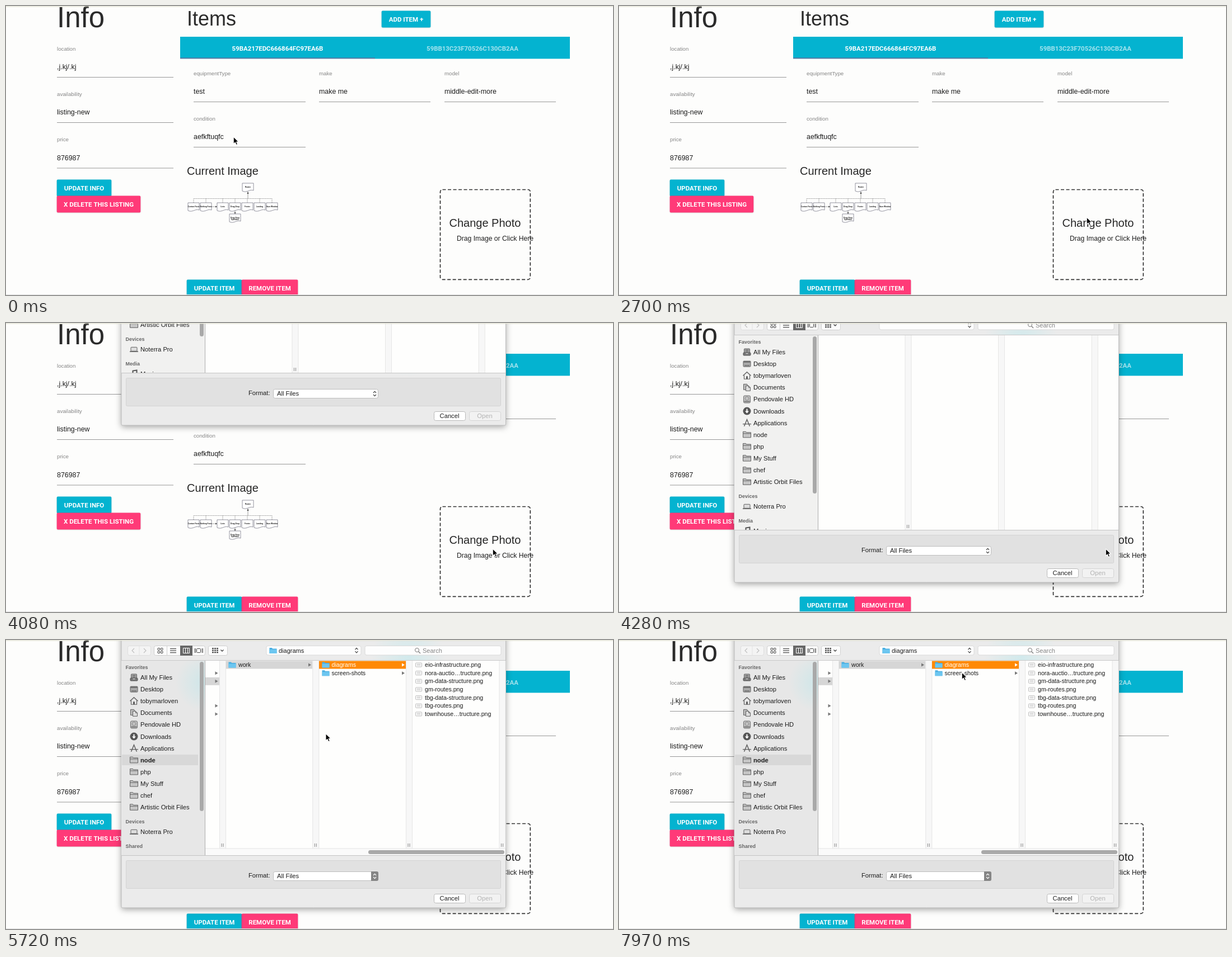
An HTML page with a canvas for the animation above (7990 ms loop, 1084 px wide and 517 px high).

```html
<!DOCTYPE html>
<html lang="en">
<head>
<meta charset="utf-8">
<title>Listing editor</title>
<style>
html, body { margin: 0; width: 100%; height: 100%; overflow: hidden; background: #fdfdfc; }
canvas { display: block; width: 1084px; height: 517px; }
</style>
</head>
<body>
<canvas id="stage"></canvas>
<script>
const W = 1084, H = 517, LOOP = 7990;
const canvas = document.getElementById('stage');
const dpr = window.devicePixelRatio || 1;
canvas.width = W * dpr;
canvas.height = H * dpr;
const c = canvas.getContext('2d');

const SANS = '"Liberation Sans", Arial, sans-serif';
const ROBOTO = 'Roboto, sans-serif';
const CYAN = '#04b3d0', PINK = '#ff3a78', INK = '#1c1c1c';

// ---------- drawing helpers ----------
function text(s, x, y, size, color = INK, { align = 'left', weight = 400, font = SANS } = {}) {
  c.font = `${weight} ${size}px ${font}`;
  c.textAlign = align;
  c.fillStyle = color;
  c.fillText(s, x, y);
}
function rect(x, y, w, h, color) {
  c.fillStyle = color;
  c.fillRect(x, y, w, h);
}
function box(x, y, w, h, r, fill, stroke) {
  c.beginPath();
  c.roundRect(x, y, w, h, r);
  if (fill) { c.fillStyle = fill; c.fill(); }
  if (stroke) { c.strokeStyle = stroke; c.stroke(); }
}
function path(pts, { fill, stroke, close = false, width = 1 } = {}) {
  c.beginPath();
  for (let i = 0; i < pts.length; i += 2) c.lineTo(pts[i], pts[i + 1]);
  if (close) c.closePath();
  if (fill) { c.fillStyle = fill; c.fill(); }
  if (stroke) { c.lineWidth = width; c.strokeStyle = stroke; c.stroke(); c.lineWidth = 1; }
}
function withShadow(blur, dy, alpha, draw) {
  c.save();
  c.shadowColor = `rgba(0,0,0,${alpha})`;
  c.shadowBlur = blur * dpr;
  c.shadowOffsetY = dy * dpr;
  draw();
  c.restore();
}
function at(x, y, draw) {
  c.save();
  c.translate(x, y);
  draw();
  c.restore();
}

// ---------- page ----------
function button(label, x, y, w, color) {
  withShadow(2, .5, .2, () => box(x - .3, y - .5, w + .6, 30, 2, color));
  text(label, x + w / 2, y + 19, 11.5, '#fff', { align: 'center', weight: 700, font: ROBOTO });
}
function field(label, value, x, y, w) {
  text(label, x, y + 3.5, 9.7, '#868686');
  text(value, x, y + 37, 12.4);
  rect(x, y + 51, w, 1, '#979797');
}
function note(label, x, y) {
  c.beginPath();
  c.moveTo(x - 10, y + 14);
  c.lineTo(x - 10, y);
  c.lineTo(x + 10, y);
  c.lineTo(x + 10, y + 13);
  c.bezierCurveTo(x + 3, y + 10, x - 2, y + 18, x - 10, y + 14);
  c.fillStyle = '#fff';
  c.fill();
  c.lineWidth = .7;
  c.strokeStyle = '#667';
  c.stroke();
  c.lineWidth = 1;
  label.split('|').forEach((s, i) =>
    text(s, x, y + 7.5 + i * 3.4, 3.2, '#111', { align: 'center', weight: 700 }));
}
function diagram() {
  c.setLineDash([2, 1]);
  path([335, 352, 335, 344.5, 475, 344.5, 475, 352], { stroke: '#888', width: .8 });
  for (const x of [357, 387, 409, 431, 453]) path([x, 344.5, x, 352], { stroke: '#888', width: .8 });
  c.setLineDash([]);
  path([432, 344, 432, 332], { stroke: '#888', width: .8 });
  path([430.5, 336, 432, 332, 433.5, 336], { fill: '#444' });
  path([367, 359, 377, 359], { stroke: '#999', width: .8 });
  path([374, 357.5, 377, 359, 374, 360.5], { fill: '#444' });
  path([409, 366, 409, 372], { stroke: '#777', width: .8 });
  path([407.5, 369, 409, 372, 410.5, 369], { fill: '#444' });
  note('Router', 432, 317);
  ['Contact Form', 'Nothing Form', 'Lists', 'Drag-Drop', 'Footer', 'Landing', 'Save Window']
    .forEach((s, i) => note(s, [335, 357, 387, 409, 431, 453, 475][i], 352));
  note('Drag-Drop|Uploader', 409, 372);
}
function page() {
  rect(0, 0, W, H, '#fdfdfc');
  text('Info', 91, 38, 51, '#2b2b2b');
  field('location', ',j.kj/.kj', 91, 76, 208);
  field('availability', 'listing-new', 91, 157, 208);
  field('price', '876987', 91, 238.5, 208);
  button('UPDATE INFO', 91, 311, 97, CYAN);
  button('X DELETE THIS LISTING', 91, 340, 149, PINK);

  text('Items', 323, 35, 36, '#2b2b2b');
  button('ADD ITEM +', 671, 9, 87, CYAN);
  rect(311, 55, 696, 39.4, CYAN);
  rect(311, 92.7, 348, 1.3, '#76618f');
  const tab = { align: 'center', weight: 700, font: ROBOTO };
  text('59BA217EDC666864FC97EA6B', 485, 79.5, 11.4, '#fff', tab);
  text('59BB13C23F70526C130CB2AA', 833, 79.5, 11.4, 'rgba(255,255,255,.64)', tab);
  field('equipmentType', 'test', 335, 120, 200);
  field('make', 'make me', 559, 120, 199);
  field('model', 'middle-edit-more', 783, 120, 199);
  field('condition', 'aefkftuqfc', 335, 201, 200);

  text('Current Image', 323, 301.5, 20, '#262626');
  diagram();
  button('UPDATE ITEM', 323, 490, 98, CYAN);
  button('REMOVE ITEM', 421, 490, 100, PINK);

  c.setLineDash([6, 3.5]);
  c.lineWidth = 1.7;
  box(775.5, 328.5, 160.8, 160.8, 4, null, '#333');
  c.lineWidth = 1;
  c.setLineDash([]);
  text('Change Photo', 791.5, 395, 20, '#262626');
  text('Drag Image or Click Here', 805, 420, 12.15);
}

// ---------- icons, drawn around 0,0 ----------
const GREY = '#606060';
const icons = {
  folder() {
    path([-7, 5, -7, -5.5, -2, -5.5, -1, -4, 7, -4, 7, 5], { close: true, fill: '#c6c6c6', stroke: GREY });
    path([-7, -2, 7, -2], { stroke: GREY });
  },
  tray() {
    box(-5, -6, 10, 8, 1, '#aaa', GREY);
    path([-3, -3.5, 3, -3.5], { stroke: '#555' });
    path([-3, -1, 3, -1], { stroke: '#555' });
    box(-6.5, 1, 13, 5, 1, '#777', '#555');
    rect(-2, 2, 4, 1.2, '#ddd');
  },
  desktop() {
    box(-6.5, -5, 13, 10, 1, '#aaa', GREY);
    rect(-6, -4.5, 12, 2, '#666');
    for (let i = -4; i < 5; i += 3) rect(i, 2, 2, 2, '#666');
  },
  house() {
    path([-7, 0, 0, -6.5, 7, 0], { stroke: GREY, width: 1.4 });
    path([-5, -1, -5, 6, 5, 6, 5, -1], { stroke: GREY, width: 1.2 });
    rect(-1.5, 1, 3, 5, GREY);
  },
  docs() {
    path([-6, -6, 0, -6, 2, -3, 2, 4, -6, 4], { close: true, fill: '#bbb', stroke: GREY });
    path([-2, -3, 3, -3, 6, 0, 6, 6, -2, 6], { close: true, fill: '#ddd', stroke: GREY });
    path([3, -3, 3, 0, 6, 0], { stroke: GREY });
  },
  disk() {
    box(-6, -6.5, 12, 13, 2, '#c2c2c2', '#707070');
    c.beginPath();
    c.arc(0, -1.5, 3.3, 0, 7);
    c.strokeStyle = '#888';
    c.stroke();
    rect(-5, 3, 10, 2, '#777');
  },
  down() {
    c.beginPath();
    c.arc(0, 0, 7, 0, 7);
    c.fillStyle = '#555';
    c.fill();
    path([0, -4, 0, 3], { stroke: '#fff', width: 2 });
    path([-3.5, 0, 0, 4, 3.5, 0], { fill: '#fff' });
  },
  apps() {
    path([-5, 6, 0, -6, 5, 6], { stroke: GREY, width: 1.5 });
    path([-7.5, 2, 7.5, 2], { stroke: GREY, width: 1.3 });
  },
  laptop() {
    box(-5.5, -4, 11, 7, 1, '#ddd', GREY);
    rect(-7.5, 3, 15, 1.6, GREY);
  },
  music() {
    path([-2, 5, -2, -5, 5, -6, 5, 3], { stroke: '#555', width: 2 });
  },
  blue() {
    path([-6.5, 5, -6.5, -5, -2, -5, -1, -3.5, 6.5, -3.5, 6.5, 5], { close: true, fill: '#4aafe2' });
    rect(-6.5, -2, 13, 7, '#6cc6f0');
  },
  image() {
    box(-5.5, -3.5, 11, 7, 1, '#fff', '#bbb');
    path([-3.5, -1, 3.5, -1], { stroke: '#bbb' });
    path([-3.5, 1, 3.5, 1], { stroke: '#ccc' });
  }
};
const icon = (name, x, y) => at(x, y, icons[name]);
function updown(x, y, color) {
  path([x - 2.5, y - 1.5, x, y - 4.2, x + 2.5, y - 1.5], { stroke: color, width: 1.2 });
  path([x - 2.5, y + 1.5, x, y + 4.2, x + 2.5, y + 1.5], { stroke: color, width: 1.2 });
}
const arrow = (x, y, color) => path([x - 2.5, y - 3, x + 2.5, y, x - 2.5, y + 3], { fill: color });

// ---------- file dialog ----------
const places = [
  ['tray', 'All My Files'], ['desktop', 'Desktop'], ['house', 'tobymarloven'],
  ['docs', 'Documents'], ['disk', 'Pendovale HD'], ['down', 'Downloads'],
  ['apps', 'Applications'], ['folder', 'node'], ['folder', 'php'],
  ['folder', 'My Stuff'], ['folder', 'chef'], ['folder', 'Artistic Orbit Files']
];
const files = ['eio-infrastructure.png', 'nora-auctio…tructure.png', 'gm-data-structure.png',
  'gm-routes.png', 'tbg-data-structure.png', 'tbg-routes.png', 'townhouse…tructure.png'];

function glow(x, y, r, alpha) {
  const g = c.createRadialGradient(x, y, 0, x, y, r);
  g.addColorStop(0, `rgba(150,230,238,${alpha})`);
  g.addColorStop(1, 'rgba(150,230,238,0)');
  c.fillStyle = g;
  c.fillRect(x - r, y - r, 2 * r, 2 * r);
}
function place(name, label, y, weight = 400) {
  icon(name, 228.5, y);
  text(label, 240, y + 4, 11.2, INK, { weight });
}
function toolbar(filled) {
  const edge = '#cfcfcf';
  box(217.5, 10.5, 41, 17, 3, '#f4f4f4', '#dedede');
  path([229, 15, 225, 19, 229, 23], { stroke: '#c0c0c0', width: 1.2 });
  path([246, 15, 250, 19, 246, 23], { stroke: '#c0c0c0', width: 1.2 });
  path([238, 11, 238, 27], { stroke: '#e2e2e2' });

  box(264.5, 10.5, 91, 17, 3, '#fcfcfc', edge);
  rect(311, 10, 22, 18, '#676767');
  path([287.5, 11, 287.5, 27], { stroke: edge });
  for (const x of [271, 276.5]) for (const y of [14.5, 20]) box(x, y, 3.5, 3.5, .5, null, '#444');
  for (const y of [15, 18.5, 22]) rect(293, y, 11, 1.2, '#444');
  box(316.5, 14.5, 11, 9, 0, null, '#fff');
  for (const x of [320, 324]) rect(x, 14.5, 1, 9, '#fff');
  box(340.5, 15.5, 7, 7, 1, null, '#444');
  for (const x of [336.5, 338, 349.5, 351]) rect(x, 15, .9, 8, '#555');

  box(361.5, 10.5, 34, 17, 3, '#fcfcfc', edge);
  for (let i = 0; i < 3; i++) for (const y of [14, 17.5, 21]) rect(368 + i * 4, y, 3, 2.3, '#555');
  path([383.5, 17.5, 386, 20, 388.5, 17.5], { stroke: '#444', width: 1.3 });

  box(465, 10.5, 169, 16.5, 3, '#fdfdfd', '#dadada');
  updown(626, 18.7, '#444');
  if (filled) {
    icon('blue', 477, 19);
    text('diagrams', 487, 22.8, 11);
  }
  box(641, 10.5, 243, 16.5, 3, '#fdfdfd', '#dadada');
  c.beginPath();
  c.arc(734, 18, 3.5, 0, 7);
  c.strokeStyle = '#777';
  c.stroke();
  path([736.5, 20.5, 740, 24], { stroke: '#777', width: 1.3 });
  text('Search', 744, 22.8, 11, '#858585');
}
function sidebar(filled, ready) {
  c.save();
  c.beginPath();
  c.rect(206, 37, 149, 348);
  c.clip();
  rect(206, 37, 149, 348, ready ? '#e7e7e7' : '#f1f1f0');
  if (ready) glow(355, 76, 52, .3);
  if (filled) rect(207, 205, 136, 19, '#d8d8d8');
  const head = (s, y) => text(s, 213.5, y, 9, '#666', { weight: 700 });
  head('Favorites', 51.5);
  places.forEach(([name, label], i) =>
    place(name, label, 67 + i * 21.12, filled && label === 'node' ? 700 : 400));
  head('Devices', 327.8);
  place('laptop', 'Noterra Pro', 343.3);
  head(ready ? 'Shared' : 'Media', 371.8);
  if (!ready) place('music', 'Music', 386.5);
  box(346, 39, 7, ready ? 267 : 281, 3.5, '#a9a9a9');
  c.restore();
  rect(355, 37, 1, 348, '#adadad');
}
function strip(x, bottom, grip) {
  rect(x, 37, 11.5, bottom - 37, '#f7f7f7');
  rect(x, 37, 1, bottom - 37, '#e6e6e6');
  rect(x + 11, 37, 1, bottom - 37, '#e6e6e6');
  if (grip) for (const dx of [3.5, 6.5]) rect(x + dx, bottom - 9, 1, 6, '#888');
}
function columns(filled) {
  rect(356, 37, 536, 348, '#fefefd');
  if (!filled) {
    [510.5, 677, 843.7].forEach((x, i) => strip(x, 385, i === 0));
    return;
  }
  const row = i => 44.5 + i * 14.65;
  for (const x of [381, 547.3, 714, 880.5]) strip(x, 373, true);
  rect(356, row(2) - 7, 25, 14, '#d6d6d6');
  for (const i of [1, 2, 5, 6]) arrow(376, row(i), '#777');

  rect(393, 37.5, 154, 14, '#d6d6d6');
  icon('blue', 404, row(0));
  text('work', 415, row(0) + 3.6, 10.6);
  arrow(542.5, row(0), '#777');

  rect(559, 37.5, 155, 14, '#ff8905');
  icon('blue', 571, row(0));
  text('diagrams', 581.5, row(0) + 3.6, 10.6, '#fff');
  arrow(709.5, row(0), '#fff');
  icon('blue', 571, row(1));
  text('screen-shots', 581.5, row(1) + 3.6, 10.6);
  arrow(709.5, row(1), '#777');

  files.forEach((s, i) => {
    icon('image', 737, row(i));
    text(s, 748, row(i) + 3.6, 10.6);
  });
  rect(356, 373, 536, 12, '#fafafa');
  rect(356, 372.5, 536, 1, '#e6e6e6');
  box(647, 376, 243, 7, 3.5, '#a9a9a9');
}
function dialog(off, filled, ready) {
  c.save();
  c.beginPath();
  c.rect(0, 1, W, H);
  c.clip();
  c.translate(0, off);
  withShadow(12, 3, .36, () => box(206, -20, 686.5, 499, 2, '#ebebeb'));
  box(206, -20, 686.5, 499, 2, null, '#bcbcbc');
  box(214.5, 394.5, 669, 50, 2, '#e1e1e1', '#d3d3d3');

  c.save();
  c.beginPath();
  c.rect(207, 0, 685, 478);
  c.clip();
  glow(718, 30 - off, 66, .3);
  c.restore();

  toolbar(filled);
  rect(206, 36, 686, 1, '#c9c9c9');
  sidebar(filled, ready);
  columns(filled);
  rect(206, 385, 686, 1, '#c4c4c4');

  text('Format:', 471.5, 425.3, 11.2, INK, { align: 'right' });
  box(477.5, 414.5, 187, 16, 3, '#fff', '#bdbdbd');
  if (ready) box(652, 414, 13, 17, [0, 3, 3, 0], '#858585');
  updown(658.5, 422.5, ready ? '#fff' : '#444');
  text('All Files', 484, 426.3, 11.2);
  box(764.5, 454.5, 56, 16, 3, '#fff', '#b9b9b9');
  text('Cancel', 792, 466.2, 11.2, INK, { align: 'center' });
  box(827.5, 454.5, 56, 16, 3, '#f2f2f2', '#d4d4d4');
  text('Open', 855, 466.2, 11.2, '#b3b3b3', { align: 'center' });
  c.restore();
}

// ---------- motion ----------
const track = [
  [0, 406.5, 234.5], [2700, 835.5, 378.5], [3260, 869.5, 404.5], [4300, 869.5, 404.5],
  [4970, 678.5, 304.5], [6410, 477.5, 48.5], [LOOP - 20, 612.5, 58.5], [LOOP, 612.5, 58.5]
];
const ease = u => (1 - Math.cos(Math.PI * Math.min(1, Math.max(0, u)))) / 2;
function pointer(t) {
  const i = track.findIndex(k => k[0] > t);
  const [t0, x0, y0] = track[i - 1], [t1, x1, y1] = track[i];
  const e = ease((t - t0) / (t1 - t0));
  at(x0 + (x1 - x0) * e, y0 + (y1 - y0) * e, () => {
    c.lineJoin = 'round';
    path([0, 0, 0, 12, 2.8, 9.4, 4.9, 14, 7, 13.1, 5, 8.6, 8.6, 8.6],
      { close: true, fill: '#000', stroke: '#fff', width: 1.6 });
    path([0.3, 0.8, 0.3, 11, 2.9, 8.6, 5.1, 13.2, 6.3, 12.7, 4.2, 8, 7.6, 8], { close: true, fill: '#000' });
    c.lineJoin = 'miter';
  });
}

const SLIDE = 3898, SLIDE_TIME = 432, READY = 4400, FILLED = 5400;
function frame() {
  const t = performance.now() % LOOP;
  c.setTransform(dpr, 0, 0, dpr, 0, 0);
  page();
  if (t >= SLIDE) {
    const off = Math.round(-479 * (1 - ease((t - SLIDE) / SLIDE_TIME)));
    dialog(off, t >= FILLED, t >= READY);
  }
  rect(0, 0.5, W, 1, '#dcdcca');
  rect(0, 516, W, 1, '#e2e2e2');
  pointer(t);
  requestAnimationFrame(frame);
}
frame();
</script>
</body>
</html>
```
